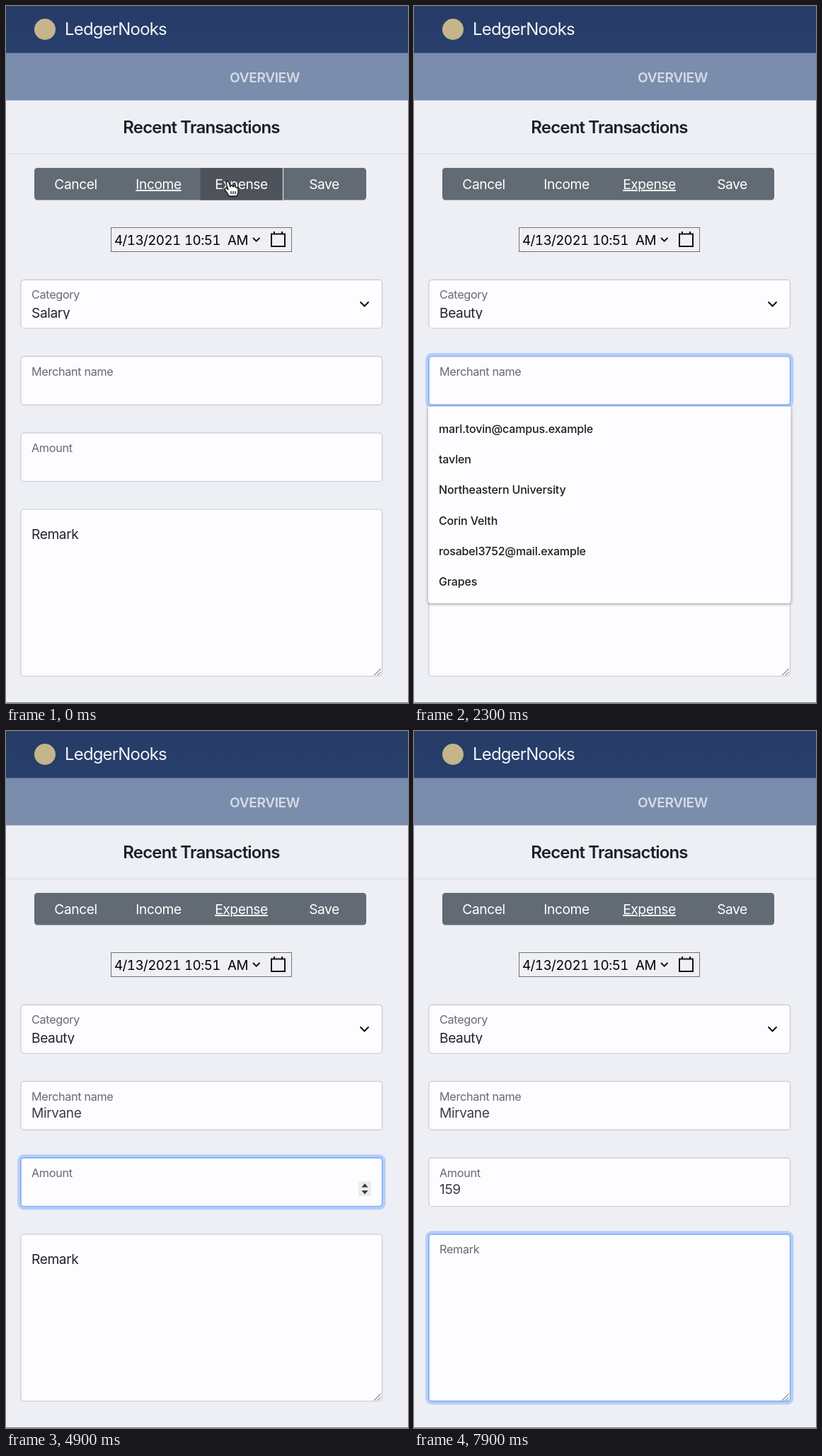
Write an HTML page that moves like this. It is 568 px wide and 986 px high and loops after 8 s.

```html
<!DOCTYPE html>
<html lang="en">
<head>
<meta charset="utf-8">
<title>Add a transaction</title>
<style>
  html, body { margin: 0; width: 100%; height: 100%; overflow: hidden; background: #eeeff5; }
  svg { display: block; width: 100vw; height: 100vh; }
  text { font: 19.2px Inter, Roboto, sans-serif; letter-spacing: -.022em; fill: #212529; white-space: pre; }
  .brand { font-size: 24px; letter-spacing: -.035em; fill: #f3f5f9; }
  .tab { font-weight: 600; fill: #d5dbe6; text-anchor: middle; }
  .title { font-size: 24px; font-weight: 600; letter-spacing: -.035em; text-anchor: middle; fill: #1c2026; }
  .button { fill: #fff; text-anchor: middle; }
  .chosen { text-decoration: underline; }
  .date { font-size: 18.8px; letter-spacing: -.03em; font-variant-numeric: tabular-nums; fill: #000; }
  .label { font-size: 16.3px; fill: #666a70; }
  .value { fill: #3a4047; }
  .option { font-size: 16px; font-weight: 500; letter-spacing: -.01em; fill: #1d1d1f; }
  .line { fill: none; stroke: #111; stroke-width: 2; }
  .field { fill: #fdfcff; stroke: #c5c9d3; stroke-width: 1.2; }
  .focus { fill: none; stroke: #86b7fe; stroke-width: 1.4; }
  .glow { fill: none; stroke: #0d6efd; stroke-opacity: .25; stroke-width: 4.4; }
  #menu { filter: drop-shadow(0 1px 2px rgba(0, 0, 0, .45)); }
</style>
</head>
<body>
<svg viewBox="0 0 568 986" preserveAspectRatio="none">
  <defs>
    <linearGradient id="navy" x2="0" y2="1">
      <stop stop-color="#263b66"/><stop offset="1" stop-color="#293f6c"/>
    </linearGradient>
    <clipPath id="selectClip"><rect x="30" y="420" width="300" height="23"/></clipPath>
  </defs>

  <rect width="568" height="986" fill="#eeeff5"/>
  <rect width="568" height="67" fill="url(#navy)"/>
  <rect y="66.5" width="568" height="67" fill="#7a8dad"/>
  <circle cx="55" cy="33" r="15" fill="#c5b58b"/>
  <text class="brand" x="83" y="41">LedgerNooks</text>
  <text class="tab" x="365.5" y="107.5">OVERVIEW</text>
  <text class="title" x="276" y="179.5">Recent Transactions</text>
  <path d="M0 209H568" stroke="#d8dae0"/>
  <path d="M0 985.5H568" stroke="#777b83"/>

  <rect x="40" y="229" width="469" height="45.5" rx="4.5" fill="#626b73"/>
  <g id="hover">
    <rect x="274.5" y="229" width="117" height="45.5" fill="#4e535b"/>
    <path d="M391.5 229V274.5" stroke="#dfe2e6" stroke-width="1.2"/>
  </g>
  <g id="buttons"></g>

  <rect x="148.5" y="313.5" width="255" height="34" fill="#eff0f5" stroke="#6f7277"/>
  <text class="date" x="153" y="338">4/13/2021</text>
  <text class="date" x="252" y="338">10:51</text>
  <text class="date" x="313" y="338">AM</text>
  <path class="line" d="M349 328l4.7 4.7 4.7-4.7"/>
  <path class="line" d="M375 322.5H394V340H375ZM379 319V323M390 319V323"/>

  <g id="fields"></g>
  <path class="line" d="M500.5 418.5l6 6 6-6"/>
  <text id="category" class="value" style="fill:#212529" x="36" y="440.5" clip-path="url(#selectClip)"></text>
  <text id="merchant" class="value" x="36" y="546.5"></text>
  <text id="amount" class="value" x="36" y="655"></text>
  <text id="remarkLabel" x="36">Remark</text>
  <g id="spinner">
    <rect x="498" y="637" width="18" height="21" fill="#ecebee"/>
    <path d="M502.5 645.5l4.5-5.5 4.5 5.5ZM502.5 650l4.5 5.5 4.5-5.5Z" fill="#3c3c3f"/>
  </g>
  <path d="M520 947l9.5-9.5M525 947l4.5-4.5" stroke="#555" fill="none"/>
  <rect id="caret" width="1.2" height="21" fill="#222"/>

  <g id="menu">
    <path d="M20 566.5H532.5V841q0 4-4 4H24q-4 0-4-4Z" fill="#fdfcff"/>
  </g>

  <g id="pointer">
    <path id="hand" fill="#fff" stroke="#111" stroke-width="1.3" stroke-linejoin="round"
      d="M-4 11C-5 7-9 4-10 1C-10-1-7-1-5 2L-8-8C-8-11-5-11-4-8L-2-2C-2-5 1-5 2-2C3-4 5-4 6-1C8-2 9 0 9 2V6L7 11ZM-1 4V8M2 4V8M5 4V8"/>
    <path id="arrow" fill="#000" stroke="#fff" stroke-width="1.3"
      d="M-5-10V8L-1 4L2 11L5 10L2 3H8Z"/>
    <path id="beam" fill="none" stroke="#111" stroke-width="1.6"
      d="M-4-9Q0-9 0-6Q0-9 4-9M0-6V6M-4 9Q0 9 0 6Q0 9 4 9M-2 2H2"/>
  </g>
</svg>
<script>
const LOOP = 8000;
const MERCHANT = "Mirvane", AMOUNT = "159";
const merchantKeys = [2400, 2700, 2800, 2950, 3100, 3250, 3400];
const amountKeys = [5200, 5500, 5800];
const SELECT_AT = 150;
const FOCUS = { merchant: 1500, amount: 4300, remark: 7350 };
const MENU = [1900, 2400];

// Each stroke lists time, x, y; the pointer hides at the end of its span.
const strokes = [
  { from: 0, to: 1900, path: [[300, 319, 258], [650, 245, 390], [900, 172, 500], [1000, 163, 519]] },
  { from: 3600, to: 4700, path: [[3600, 163, 519], [3850, 135, 620], [4000, 131, 631]] },
  { from: 6300, to: 7700, path: [[6300, 131, 631], [6500, 145, 752], [6700, 165, 812], [6900, 170, 824], [7000, 170, 824], [7300, 166, 797]] }
];

const $ = id => document.getElementById(id);
const NS = "http://www.w3.org/2000/svg";
function add(parent, tag, attrs, content = "") {
  const node = document.createElementNS(NS, tag);
  for (const key in attrs) node.setAttribute(key, attrs[key]);
  node.textContent = content;
  return parent.appendChild(node);
}
const clamp = v => Math.min(1, Math.max(0, v));
const ease = v => { v = clamp(v); return v * v * (3 - 2 * v); };
const within = (t, [a, b]) => t >= a && t < b;
const show = (node, on) => { node.style.display = on ? "" : "none"; };

const buttons = ["Cancel", "Income", "Expense", "Save"].map((name, i) =>
  add($("buttons"), "text", { class: "button", x: 98.5 + 117 * i, y: 259 }, name));

function addField(y, height, label) {
  const group = $("fields");
  const box = { x: 21, y, width: 510.5, height, rx: 4.5 };
  add(group, "rect", { ...box, class: "field" });
  if (label) add(group, "text", { class: "label", x: 36, y: y + 27 }, label);
  const ring = add(group, "g", {});
  add(ring, "rect", { ...box, class: "focus" });
  add(ring, "rect", { x: 18.5, y: y - 2.5, width: 515.5, height: height + 5, rx: 6.5, class: "glow" });
  return ring;
}
addField(387.3, 68.7, "Category").style.display = "none";
const rings = {
  merchant: addField(495.6, 68.7, "Merchant name"),
  amount: addField(603.8, 68.7, "Amount"),
  remark: addField(712, 236)
};

["marl.tovin@campus.example", "tavlen", "Northeastern University", "Corin Velth",
 "rosabel3752@mail.example", "Grapes"].forEach((name, i) =>
  add($("menu"), "text", { class: "option", x: 35, y: 603.5 + 43.35 * i }, name));

function pointerAt(t) {
  const stroke = strokes.find(s => within(t, [s.from, s.to]));
  if (!stroke) return null;
  const path = stroke.path;
  const next = path.findIndex(p => p[0] > t);
  if (next === 0) return path[0].slice(1);
  if (next < 0) return path[path.length - 1].slice(1);
  const [a, b] = [path[next - 1], path[next]];
  const k = (t - a[0]) / (b[0] - a[0]);
  return [a[1] + (b[1] - a[1]) * k, a[2] + (b[2] - a[2]) * k];
}

function drawPointer(t) {
  const at = pointerAt(t);
  show($("pointer"), at);
  if (!at) return;
  const [x, y] = at;
  $("pointer").setAttribute("transform", `translate(${x} ${y})`);
  const overText = [[495, 565], [603, 673], [712, 948]].some(range => within(y, range));
  show($("hand"), y < 275);
  show($("beam"), overText);
  show($("arrow"), y >= 275 && !overText);
}

function drawCaret(t) {
  const last = [...Object.values(FOCUS), ...merchantKeys, ...amountKeys]
    .filter(time => time <= t).reduce((a, b) => Math.max(a, b), -1);
  show($("caret"), last >= 0 && (t - last) % 1000 < 500);
  const active = t < FOCUS.amount ? "merchant" : t < FOCUS.remark ? "amount" : "remark";
  const typed = active === "remark" ? 0 : $(active).getComputedTextLength();
  $("caret").setAttribute("x", 36 + typed);
  $("caret").setAttribute("y", { merchant: 529.5, amount: 637.5, remark: 746 }[active]);
}

function render(t) {
  const expense = t >= SELECT_AT;
  buttons[1].classList.toggle("chosen", !expense);
  buttons[2].classList.toggle("chosen", expense);
  $("hover").style.opacity = 1 - ease((t - 350) / 150);
  $("category").textContent = expense ? "Beauty" : "Salary";

  const typed = (word, keys) => word.slice(0, keys.filter(time => time <= t).length);
  $("merchant").textContent = typed(MERCHANT, merchantKeys);
  $("amount").textContent = typed(AMOUNT, amountKeys);

  const focus = name => ease((t - FOCUS[name]) / 150);
  rings.merchant.style.opacity = focus("merchant") - focus("amount");
  rings.amount.style.opacity = focus("amount") - focus("remark");
  rings.remark.style.opacity = focus("remark");

  const lift = ease((t - FOCUS.remark) / 100);
  const label = $("remarkLabel");
  label.setAttribute("y", 754 - 15 * lift);
  label.style.fontSize = 19.2 - 2.9 * lift + "px";
  label.style.fillOpacity = 1 - .32 * lift;

  show($("spinner"), within(t, [3850, FOCUS.remark]));
  show($("menu"), within(t, MENU));
  drawCaret(t);
  drawPointer(t);
}

const start = performance.now();
function tick() {
  render((performance.now() - start) % LOOP);
  requestAnimationFrame(tick);
}
tick();
</script>
</body>
</html>
```
